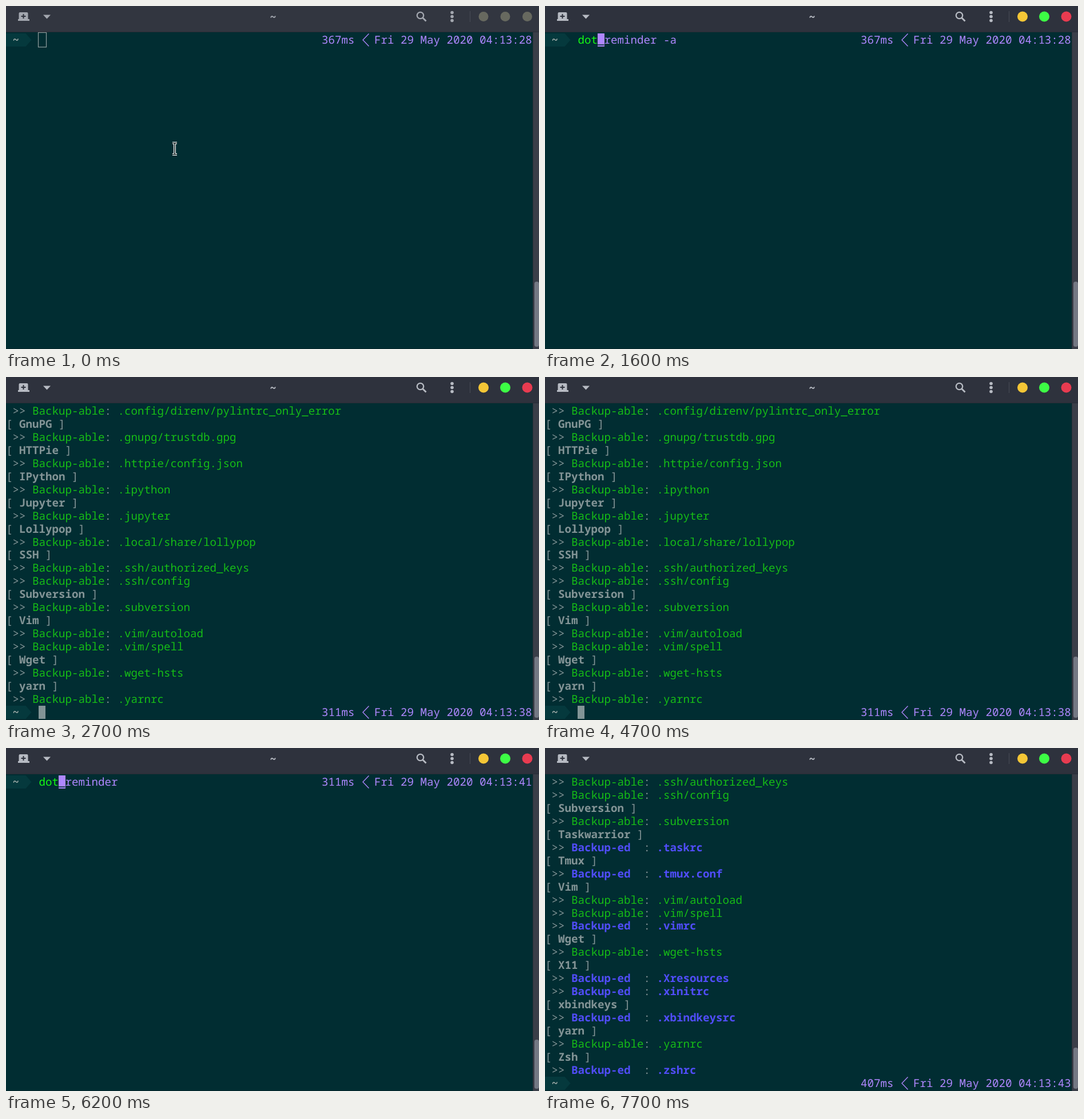
Animation of 932 by 601 pixels, one loop 8 s. Source, as an HTML page:

```html
<!DOCTYPE html>
<html lang="en">
<head>
<meta charset="utf-8">
<title>Terminal</title>
<style>
  html, body { margin: 0; width: 100%; height: 100%; overflow: hidden; background: #012d32; }
  svg { display: block; }
  text {
    font: 19.1667px "Roboto Mono", "Noto Sans Mono", "DejaVu Sans Mono", monospace;
    white-space: pre;
    text-rendering: geometricPrecision;
  }
  .gray { fill: #839496; }
  .name { fill: #839496; font-weight: 700; }
  .able { fill: #16bd16; }
  .ed { fill: #514dfb; font-weight: 700; }
  .ghost { fill: #af87ff; }
  .ok { fill: #14f914; }
  .bad { fill: #dc322f; font-weight: 700; }
  .word { fill: #c4a000; }
  .under { fill: #012d32; }
  .tilde { fill: #a9b3b0; font-weight: 700; }
  #title { font: 700 17px Roboto, "Noto Sans", sans-serif; }
</style>
</head>
<body>
<svg width="932" height="601" viewBox="0 0 932 601">
  <rect width="932" height="601" fill="#012d32"/>
  <rect y="600" width="921" height="1" fill="#07252a"/>
  <g id="screen"></g>

  <rect x="921" y="46" width="11" height="555" fill="#3a3e48"/>
  <rect x="921" y="46" width="1" height="555" fill="#2b2f38"/>
  <rect id="thumb" x="924" width="8" rx="3.5" fill="#747883"/>

  <rect width="932" height="46" fill="#323640"/>
  <rect class="focus" width="932" height="46" fill="#2e323d"/>
  <rect y="45" width="932" height="1" fill="#292d36"/>
  <g id="icons" fill="#b7bbc3">
    <path d="M24.5 11h12q2 0 2 2v10h2.500v3h-20v-3h1.500v-10q0-2 2-2z"/>
    <path d="M30.500 14v8M26.500 18h8" stroke="#2e323d" stroke-width="2"/>
    <path d="M65 15.500h13l-6.500 7z"/>
    <text id="title" x="467" y="23.500" text-anchor="middle">~</text>
    <circle cx="724.500" cy="16.500" r="5.700" fill="none" stroke="#b7bbc3" stroke-width="2.300"/>
    <path d="M728.500 20.500l6 6" stroke="#b7bbc3" stroke-width="2.800"/>
    <circle cx="780" cy="11.500" r="2.800"/>
    <circle cx="780" cy="18.500" r="2.800"/>
    <circle cx="780" cy="25.500" r="2.800"/>
  </g>
  <rect x="811" y="9" width="1" height="19" fill="#484c55"/>
  <g fill="#67695f">
    <circle cx="835" cy="18.500" r="8.500"/>
    <circle cx="873" cy="18.500" r="8.500"/>
    <circle cx="911.500" cy="18.500" r="8.500"/>
  </g>
  <g class="focus">
    <circle cx="835" cy="18.500" r="9" fill="#f4c636"/>
    <circle cx="873" cy="18.500" r="9" fill="#3dfd45"/>
    <circle cx="911.500" cy="18.500" r="9" fill="#e83b50"/>
  </g>

  <g id="pointer" fill="none" stroke-linejoin="round">
    <path d="M291 240h8M295 240v20M291 260h8" stroke="#fff" stroke-width="4"/>
    <path d="M291 240h8M295 240v20M291 260h8" stroke="#0b1a1c" stroke-width="1.600"/>
  </g>
</svg>
<script>
const LOOP = 8000, TICK = 100, CELL = 11.5, LAST = 23;
const $ = id => document.getElementById(id);
const top_ = row => Math.round(47.8 + 22.97 * row);

// '.path' can be backed up, '+.path' already is, anything else is a heading.
const FIRST_LIST = `.config/direnv/pylintrc_only_error GnuPG .gnupg/trustdb.gpg HTTPie
  .httpie/config.json IPython .ipython Jupyter .jupyter Lollypop .local/share/lollypop
  SSH .ssh/authorized_keys .ssh/config Subversion .subversion Vim .vim/autoload .vim/spell
  Wget .wget-hsts yarn .yarnrc`.split(/\s+/);
const FULL_LIST = `.ssh/authorized_keys .ssh/config Subversion .subversion Taskwarrior +.taskrc
  Tmux +.tmux.conf Vim .vim/autoload .vim/spell +.vimrc Wget .wget-hsts X11 +.Xresources
  +.xinitrc xbindkeys +.xbindkeysrc yarn .yarnrc Zsh +.zshrc`.split(/\s+/);

const put = (row, col, cls, str) =>
  `<text class="${cls}" x="${col * CELL}" y="${top_(row) + 18}">${str}</text>`;

const cursor = (row, col, fill = '#839496') =>
  `<rect x="${Math.floor(col * CELL)}" y="${top_(row)}" width="12" height="23" fill="${fill}"/>`;

const hollow = () =>
  '<rect x="56.500" y="46.500" width="14" height="25.500" fill="none" stroke="#929e9e" stroke-width="1.200"/>';

function prompt(row) {
  const y = top_(row);
  return `<path d="M0 ${y}H34.500L44.500 ${y + 11.5}L34.500 ${y + 23}H0z" fill="#05393d"/>` +
    put(row, 1, 'tilde', '~');
}

function clock(row, ms, time) {
  const y = top_(row);
  return put(row, 48, 'ghost', ms + 'ms') +
    `<path d="M634.500 ${y + .5}L624 ${y + 11.5}L634.500 ${y + 22.5}" fill="none" stroke="#af87ff" stroke-width="1.300"/>` +
    put(row, 56, 'ghost', 'Fri 29 May 2020 04:13:' + time);
}

// Command line on the top row: typed text, then the suggestion under the cursor.
function typing(typed, ghost, cls = 'ok', args = '') {
  const col = 5 + typed.length + args.length;
  return put(0, 5, cls, typed) + put(0, 5 + typed.length, 'gray', args) +
    cursor(0, col, ghost ? '#af87ff' : undefined) +
    put(0, col, 'under', ghost.slice(0, 1)) + put(0, col + 1, 'ghost', ghost.slice(1));
}

const running = args =>
  put(0, 5, 'ok', 'dot_reminder') + put(0, 17, 'gray', args) + cursor(1, 0);

const list = items => items.map((item, row) => {
  if (!/^[.+]/.test(item))
    return put(row, 0, 'gray', '[') + put(row, 2, 'name', item) + put(row, item.length + 3, 'gray', ']');
  const done = item[0] === '+', cls = done ? 'ed' : 'able';
  return put(row, 1, 'gray', '&gt;&gt;') + put(row, 4, cls, done ? 'Backup-ed' : 'Backup-able') +
    put(row, 15, 'gray', ':') + put(row, 17, cls, item.replace('+', ''));
}).join('');

const one = body => prompt(0) + clock(0, 367, 28) + body;
const two = body => prompt(0) + clock(0, 311, 41) + body;
const first = list(FIRST_LIST) + prompt(LAST) + clock(LAST, 311, 38);
const firstOn = first + cursor(LAST, 5);
const full = list(FULL_LIST);

// [start in ms, picture]
const SCENES = [
  [0, one(hollow())],
  [400, one(typing('', ''))],
  [1100, one(typing('d', 'ot_reminder -a', 'bad'))],
  [1500, one(typing('do', 't_reminder -a', 'word'))],
  [1600, one(typing('dot', '_reminder -a'))],
  [2000, one(typing('dot_reminder', ' -a'))],
  [2400, one(running(''))],
  [2700, firstOn],
  [3000, first],
  [3500, firstOn],
  [4100, first],
  [4700, firstOn],
  [5100, two(typing('', ''))],
  [5700, two(typing('d', '', 'bad'))],
  [5800, two(typing('d', 'ot_reminder', 'bad'))],
  [6000, two(typing('do', 't_reminder', 'word'))],
  [6200, two(typing('dot', '_reminder'))],
  [6600, two(typing('dot_reminder', ''))],
  [6900, two(typing('dot_reminder', 'a', 'ok', ' -'))],
  [7000, two(typing('dot_reminder', '', 'ok', ' -a'))],
  [7200, two(running(' -a'))],
  [7500, full + cursor(LAST, 0)],
  [7600, full + prompt(LAST)],
  [7700, full + prompt(LAST) + clock(LAST, 407, 43)]
];
const THUMBS = [[0, 483], [2700, 490], [5100, 511], [7500, 525]];

const at = (track, t) => track.filter(([start]) => start <= t).pop()[1];
let shown = -1;

function draw() {
  const t = Math.floor(performance.now() % LOOP / TICK) * TICK;
  if (t !== shown) {
    shown = t;
    $('screen').innerHTML = at(SCENES, t);
    const y = at(THUMBS, t);
    $('thumb').setAttribute('y', y);
    $('thumb').setAttribute('height', 597 - y);
    const p = Math.min(1, Math.max(0, (t - 300) / 500));
    const focus = 1 - (1 - p) ** 2;
    document.querySelectorAll('.focus').forEach(el => el.setAttribute('opacity', focus));
    $('icons').setAttribute('opacity', .85 + .15 * focus);
    $('pointer').setAttribute('visibility', t < 400 ? 'visible' : 'hidden');
  }
  requestAnimationFrame(draw);
}
draw();
</script>
</body>
</html>
```
